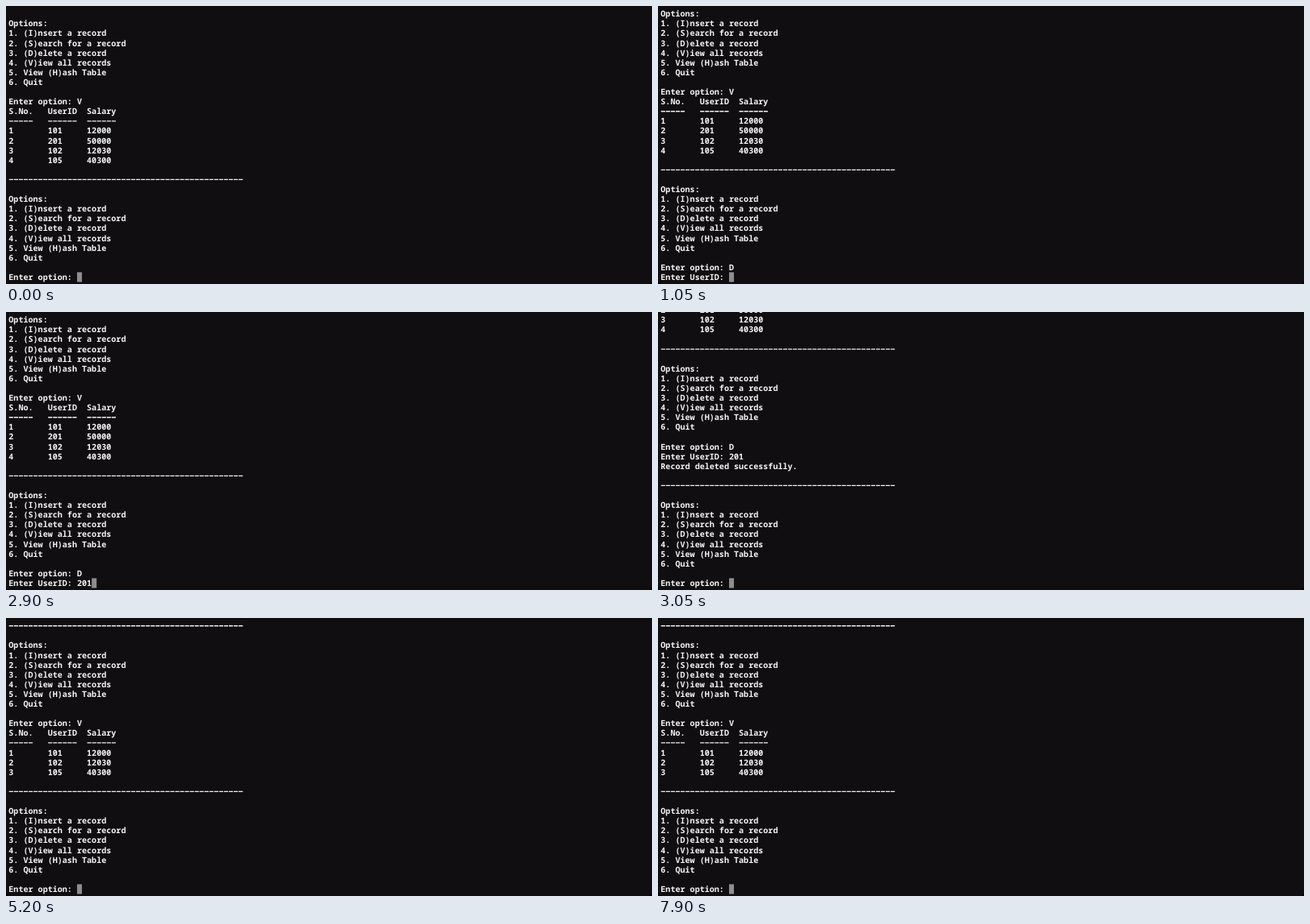
Animation, 800 px wide and 345 px high, one loop 8000 ms. Source, as an HTML page:

```html
<!DOCTYPE html>
<html lang="en">
<head>
<meta charset="utf-8">
<title>Record menu</title>
<style>
  html, body { margin: 0; width: 100%; height: 100%; overflow: hidden; background: #000; }
  #term {
    display: block; width: 800px; height: 345px; overflow: hidden;
    background: #100e11; border-radius: 0 0 5px 5px;
  }
  text {
    font: 700 10.08px "Noto Sans Mono", "DejaVu Sans Mono", monospace;
    font-variant-ligatures: none; text-rendering: geometricPrecision;
    white-space: pre; fill: #f6f6f6;
  }
  .dash { fill: none; }
  line { stroke: #f0f0f0; stroke-width: 1.3; stroke-dasharray: 5.15 .9; }
  #cursor { fill: #8e8e91; }
</style>
</head>
<body>
<svg id="term" viewBox="0 0 800 345">
  <rect id="cursor" y="330.4" width="6.05" height="12.1"/>
  <g id="rows"></g>
</svg>
<script>
const LOOP = 8000, ROW = 12.1, COL = 6.05, LEFT = 3.3, BASELINE = 339.95, VISIBLE = 29;
const OPTION = "Enter option: ", USER = "Enter UserID: ";

const menu = [
  "", "-".repeat(48), "", "Options:",
  "1. (I)nsert a record", "2. (S)earch for a record", "3. (D)elete a record",
  "4. (V)iew all records", "5. View (H)ash Table", "6. Quit", ""
];

const cells = (...values) => values.map(v => String(v).padEnd(8)).join("").trimEnd();
const table = records => [
  cells("S.No.", "UserID", "Salary"),
  cells("-----", "------", "------"),
  ...records.map(([id, salary], i) => cells(i + 1, id, salary))
];

const records = [[101, 12000], [201, 50000], [102, 12030], [105, 40300]];
const kept = records.filter(([id]) => id !== 201);

const listed = [...menu, OPTION + "V", ...table(records), ...menu];
const chosen = [...listed, OPTION + "D"];
const deleted = [...chosen, USER + "201", "Record deleted successfully.", ...menu];
const relisted = [...deleted, OPTION + "V", ...table(kept), ...menu];

// start time, finished lines, prompt, typed text, cursor visible
const steps = [
  [0, listed, OPTION, "", true],
  [350, listed, OPTION, "", false],
  [550, listed, OPTION, "D", true],
  [1050, chosen, USER, "", true],
  [1550, chosen, USER, "", false],
  [1900, chosen, USER, "", true],
  [2150, chosen, USER, "2", true],
  [2550, chosen, USER, "20", true],
  [2700, chosen, USER, "201", true],
  [3050, deleted, OPTION, "", true],
  [3550, deleted, OPTION, "", false],
  [3800, deleted, OPTION, "V", true],
  [4200, relisted, OPTION, "", true],
  [4900, relisted, OPTION, "", false],
  [5200, relisted, OPTION, "", true],
  [5550, relisted, OPTION, "", false],
  [5900, relisted, OPTION, "", true],
  [6000, relisted, OPTION, "H", true],
  [6300, relisted, OPTION, "", true],
  [6700, relisted, OPTION, "H", true],
  [6950, relisted, OPTION, "", true],
  [7550, relisted, OPTION, "", false],
  [7900, relisted, OPTION, "", true]
];

const rows = document.getElementById("rows");
const cursor = document.getElementById("cursor");
const colX = n => LEFT + n * COL;

// The hyphens stay in the text; dashed strokes give them their full cell width.
function rowMarkup(text, i) {
  const y = BASELINE - i * ROW;
  const label = text.replace(/-+/g, '<tspan class="dash">$&</tspan>');
  const strokes = [...text.matchAll(/-+/g)].map(({ 0: run, index }) =>
    `<line x1="${colX(index) + .45}" x2="${colX(index + run.length) - .45}" y1="${y - 3.5}" y2="${y - 3.5}"/>`);
  return `<text x="${LEFT}" y="${y}">${label}</text>${strokes.join("")}`;
}

function show([, log, prompt, typed, on]) {
  const input = prompt + typed;
  const lines = [...log, input].slice(-VISIBLE).reverse();
  rows.innerHTML = lines.map(rowMarkup).join("");
  cursor.setAttribute("x", colX(input.length));
  cursor.setAttribute("visibility", on ? "visible" : "hidden");
}

let shown = null;
const began = performance.now();
function tick() {
  const t = (performance.now() - began) % LOOP;
  const step = steps.findLast(s => s[0] <= t) || steps[0];
  if (step !== shown) show(shown = step);
  requestAnimationFrame(tick);
}
tick();
</script>
</body>
</html>
```
